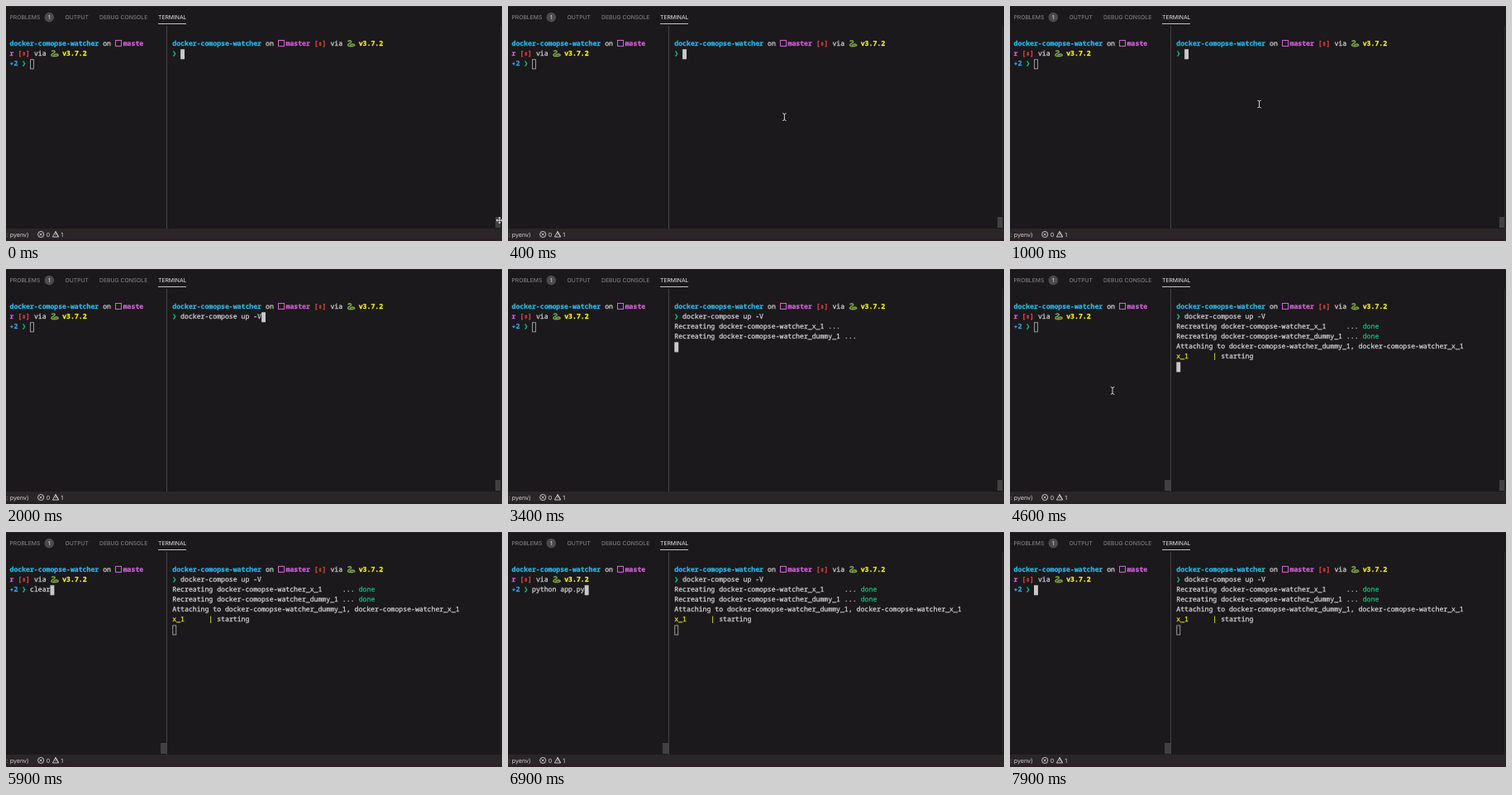
Recreate the animation shown at these times as an HTML page with a canvas. Size 600 px wide and 284 px high, loop 8 s.

```html
<!DOCTYPE html>
<html lang="en">
<head>
<meta charset="utf-8">
<title>Terminal</title>
<style>
html, body { margin: 0; width: 100%; height: 100%; overflow: hidden; background: #1b191b; }
canvas { display: block; }
</style>
</head>
<body>
<canvas id="stage" width="600" height="284"></canvas>
<script>
const ctx = document.getElementById("stage").getContext("2d");
const LOOP = 8000, CELL = 4.9, ROW = 12.05, TOP = 40, LEFT = 4.5, RIGHT = 201.3;
const FONT_SIZE = CELL / 0.6;
const MONO = '"Noto Sans Mono", "DejaVu Sans Mono", monospace';
const UI = 'Inter, Roboto, sans-serif';
const C = {
  bg: "#1b191b", text: "#d6d6d6", cyan: "#29b8ea", magenta: "#d65fdc", red: "#e04040",
  green: "#12c47f", yellow: "#f8f820", gold: "#eded14", blue: "#3b9eea", cursor: "#c8c8c8"
};

function rect(x, y, w, h, color) {
  ctx.fillStyle = color;
  ctx.fillRect(x, y, w, h);
}

function label(text, x, y, size, color) {
  ctx.font = `${size}px ${UI}`;
  ctx.fillStyle = color;
  ctx.fillText(text, x, y);
}

function line(points, color, width = 1) {
  ctx.beginPath();
  points.forEach(([x, y]) => ctx.lineTo(x, y));
  ctx.strokeStyle = color;
  ctx.lineWidth = width;
  ctx.stroke();
}

function disc(x, y, r, color) {
  ctx.beginPath();
  ctx.arc(x, y, r, 0, Math.PI * 2);
  ctx.fillStyle = color;
  ctx.fill();
}

// Text on the terminal grid, with a hairline outline for a denser stroke
function put(x0, row, col, text, color = C.text, weight = 500) {
  const x = x0 + col * CELL, y = Math.round(TOP + row * ROW + 8);
  ctx.font = `${weight} ${FONT_SIZE}px ${MONO}`;
  ctx.fillStyle = ctx.strokeStyle = color;
  ctx.lineWidth = 0.25;
  ctx.fillText(text, x, y);
  ctx.strokeText(text, x, y);
}

function cursor(x0, row, col, focused) {
  const x = x0 + col * CELL, y = TOP + 0.2 + row * ROW;
  if (focused) return rect(x, y, CELL, ROW, C.cursor);
  ctx.strokeStyle = "#a8a8a8";
  ctx.lineWidth = 0.9;
  ctx.strokeRect(x + 0.45, y + 0.45, CELL - 0.9, ROW - 0.9);
}

function snake(x0, row, col) {
  ctx.save();
  ctx.translate(x0 + col * CELL - 0.5, TOP + row * ROW);
  ctx.lineCap = "round";
  const body = new Path2D("M2.5 2.4 C6.5 1 7 3.4 4.6 4.8 C0.5 7 1.5 8.8 5.5 8.6 C8.5 8.5 10.2 8.6 10.2 7.2 C9.6 5.4 6.6 6 5 7");
  ctx.strokeStyle = "#5f8a3a";
  ctx.lineWidth = 1.7;
  ctx.stroke(body);
  ctx.strokeStyle = "#b3bd55";
  ctx.lineWidth = 0.5;
  ctx.stroke(body);
  ctx.restore();
}

function missingGlyph(x0) {
  ctx.strokeStyle = C.magenta;
  ctx.lineWidth = 1;
  ctx.strokeRect(Math.round(x0 + 26 * CELL) + 0.5, TOP + 1.5, 7, 7);
}

function gitAndVersion(x0, row, col) {
  put(x0, row, col, "[⇕]", C.red, 700);
  put(x0, row, col + 4, "via");
  snake(x0, row, col + 8);
  put(x0, row, col + 11, "v3.7.2", C.yellow, 700);
}

function promptHead(x0, branch) {
  put(x0, 0, 0, "docker-comopse-watcher", C.cyan, 700);
  put(x0, 0, 23, "on");
  missingGlyph(x0);
  put(x0, 0, 28, branch, C.magenta, 700);
}

function chrome() {
  rect(0, 0, 600, 284, C.bg);
  rect(0, 0, 600, 1, "#2c222b");
  label("PROBLEMS", 4.5, 16, 6.8, "#8c8b8c");
  disc(52.3, 13.6, 5.8, "#4b4a4c");
  label("1", 50.9, 16, 6.6, "#f0f0f0");
  label("OUTPUT", 71.5, 16, 6.8, "#8c8b8c");
  label("DEBUG CONSOLE", 113, 16, 6.8, "#8c8b8c");
  label("TERMINAL", 184, 16, 6.8, "#e4e4e4");
  rect(184, 21, 34, 1, "#c4c4c4");
  rect(194, 24, 1, 245, "#454445");
  rect(598, 24, 1, 245, "#2a2b2a");

  rect(0, 269, 600, 12, "#2a2628");
  rect(0, 281, 600, 3, "#2c1f26");
  label(": pyenv)", 0.7, 278.6, 7.1, "#d4d4d4");
  ctx.strokeStyle = "#d4d4d4";
  ctx.lineWidth = 0.9;
  ctx.beginPath();
  ctx.arc(42.2, 276, 3.6, 0, Math.PI * 2);
  ctx.stroke();
  line([[40.7, 274.5], [43.7, 277.5]], "#d4d4d4", 0.9);
  line([[43.7, 274.5], [40.7, 277.5]], "#d4d4d4", 0.9);
  label("0", 48.8, 278.6, 7.1, "#d4d4d4");
  line([[60, 272.5], [63.6, 279], [56.4, 279], [60, 272.5], [63.6, 279]], "#d4d4d4", 0.9);
  line([[60, 274.6], [60, 276.8]], "#d4d4d4", 0.8);
  label("1", 66.3, 278.6, 7.1, "#d4d4d4");
}

function leftPane(t) {
  promptHead(LEFT, "maste");
  put(LEFT, 1, 0, "r", C.magenta, 700);
  gitAndVersion(LEFT, 1, 2);
  put(LEFT, 2, 0, "✦", C.blue, 700);
  put(LEFT, 2, 1, "2", C.blue, 700);
  put(LEFT, 2, 3, "❯", C.green, 700);
  let command = "";
  if (t >= 5400 && t < 7900) command = t >= 6500 && t < 7400 ? "python app.py" : "clear";
  put(LEFT, 2, 5, command);
  cursor(LEFT, 2, 5 + command.length, t >= 5000);
  if (t >= 4500) rect(187, 255, 7, 13, "#424142");
}

function rightPane(t) {
  promptHead(RIGHT, "master");
  gitAndVersion(RIGHT, 0, 35);
  put(RIGHT, 1, 0, "❯", C.green, 700);
  const command = t < 1400 ? "" : t < 2000 ? "clear" : "docker-compose up -V";
  put(RIGHT, 1, 2, command);

  if (t >= 3400) {
    const gap = t < 3800 ? " " : "     ";
    put(RIGHT, 2, 0, "Recreating docker-comopse-watcher_x_1" + gap + "...");
    put(RIGHT, 3, 0, "Recreating docker-comopse-watcher_dummy_1 ...");
  }
  if (t >= 3800) put(RIGHT, 2, 46, "done", C.green);
  if (t >= 3900) {
    put(RIGHT, 3, 46, "done", C.green);
    put(RIGHT, 4, 0, "Attaching to docker-comopse-watcher_dummy_1, docker-comopse-watcher_x_1");
  }
  if (t >= 4000) {
    put(RIGHT, 5, 0, "x_1      |", C.gold);
    put(RIGHT, 5, 11, "starting");
  }

  const row = t < 2900 ? 1 : t < 3400 ? 2 : t < 3900 ? 4 : t < 4000 ? 5 : 6;
  cursor(RIGHT, row, row === 1 ? 2 + command.length : 0, t < 5000);
  if (t < 5500) rect(592, 255, 6, 13, "#424142");
}

function beam(x, y) {
  const strokes = [
    [[x, y - 3.5], [x, y + 3.5]],
    [[x - 2.2, y - 4.5], [x, y - 3.5], [x + 2.2, y - 4.5]],
    [[x - 2.2, y + 4.5], [x, y + 3.5], [x + 2.2, y + 4.5]]
  ];
  strokes.forEach(s => line(s, "#101010", 2));
  strokes.forEach(s => line(s, "#e0e0e0", 1));
}

function moveCross(x, y) {
  for (const [color, width, tip] of [["#111111", 2.6, 5], ["#f0f0f0", 1, 4.3]]) {
    line([[x - 3, y], [x + 3, y]], color, width);
    line([[x, y - 3], [x, y + 3]], color, width);
    for (let i = 0; i < 4; i++) {
      ctx.save();
      ctx.translate(x, y);
      ctx.rotate(i * Math.PI / 2);
      ctx.beginPath();
      ctx.moveTo(tip, 0);
      ctx.lineTo(2.4, -1.9);
      ctx.lineTo(2.4, 1.9);
      ctx.fillStyle = color;
      ctx.fill();
      ctx.restore();
    }
  }
}

// The pointer moves once every 100 ms
function pointer(t) {
  const step = Math.floor(t / 100);
  if (step === 0) return moveCross(597, 259);
  if (t < 1400) {
    const rest = Math.pow(1 - Math.min(step / 6, 1), 2);
    return beam(301.5 + 295.5 * rest, 118.5 + 140.5 * rest);
  }
  if (t >= 4400 && t < 5400) {
    const path = [[295, 158], [192, 151], [124, 147], [110, 143], [103, 139], [100, 137], [100, 136]];
    beam(...path[Math.min(step - 44, path.length - 1)]);
  }
}

function draw(now) {
  const t = now % LOOP;
  ctx.textRendering = "geometricPrecision";
  chrome();
  leftPane(t);
  rightPane(t);
  pointer(t);
}

const start = performance.now();
function tick() {
  draw(performance.now() - start);
  requestAnimationFrame(tick);
}
tick();
</script>
</body>
</html>
```
